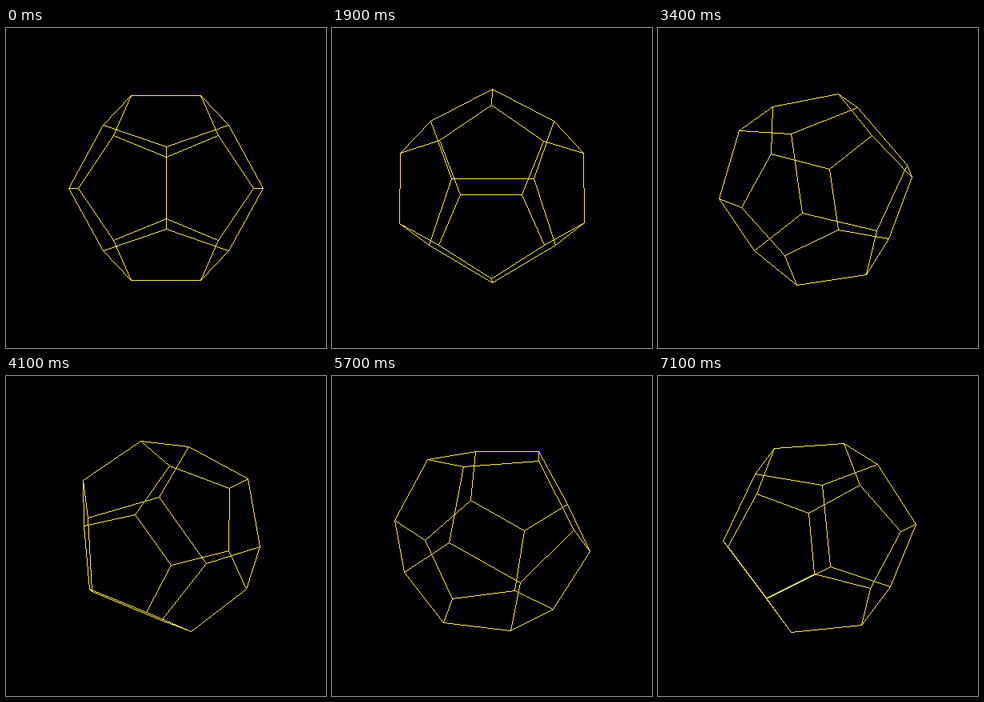
These frames come from a looping animation (400 by 400 pixels, 7200 ms). An HTML page with a canvas:

```html
<!DOCTYPE html>
<html>
<head>
<meta charset="utf-8">
<title>Rotating dodecahedron</title>
<style>
  html, body { margin: 0; width: 100%; height: 100%; overflow: hidden; background: #000; }
  canvas { display: block; }
</style>
</head>
<body>
<canvas id="stage" width="400" height="400"></canvas>
<script>
const ctx = document.getElementById('stage').getContext('2d');
const PHI = (1 + Math.sqrt(5)) / 2;
const STEP_MS = 100, STEPS = 72;
const CENTER = 200, SCALE = 71.12, DIST = 11.315;

const verts = [];
for (const a of [-1, 1]) for (const b of [-1, 1]) {
  const p = a / PHI, q = b * PHI;
  verts.push([0, p, q], [p, q, 0], [q, 0, p], [a, b, -1], [a, b, 1]);
}

// Neighbouring vertices are 2 / PHI apart.
const edges = [];
verts.forEach((v, i) => {
  for (let j = i + 1; j < verts.length; j++) {
    const w = verts[j];
    if (Math.hypot(v[0] - w[0], v[1] - w[1], v[2] - w[2]) < 1.3) edges.push([i, j]);
  }
});

// Turn about x, then y, then z by the same angle, then apply perspective.
function project([x, y, z], angle) {
  const c = Math.cos(angle), s = Math.sin(angle);
  [y, z] = [y * c + z * s, z * c - y * s];
  [x, z] = [x * c - z * s, x * s + z * c];
  [x, y] = [x * c - y * s, x * s + y * c];
  const k = SCALE * DIST / (DIST - z);
  return [Math.floor(CENTER + x * k), Math.floor(CENTER + y * k)];
}

// One-pixel line without antialiasing.
function line([x0, y0], [x1, y1]) {
  const dx = x1 - x0, dy = y1 - y0;
  const n = Math.max(Math.abs(dx), Math.abs(dy), 1);
  for (let i = 0; i <= n; i++) {
    ctx.fillRect(Math.round(x0 + dx * i / n), Math.round(y0 + dy * i / n), 1, 1);
  }
}

function draw(step) {
  const pts = verts.map(v => project(v, step / STEPS * 2 * Math.PI));
  ctx.fillStyle = '#000';
  ctx.fillRect(0, 0, 400, 400);
  ctx.fillStyle = '#ffe640';
  for (const [i, j] of edges) line(pts[i], pts[j]);
}

const start = performance.now();
let shown = -1;
function tick() {
  const step = Math.floor((performance.now() - start) / STEP_MS) % STEPS;
  if (step !== shown) draw(shown = step);
  requestAnimationFrame(tick);
}
tick();
</script>
</body>
</html>
```
